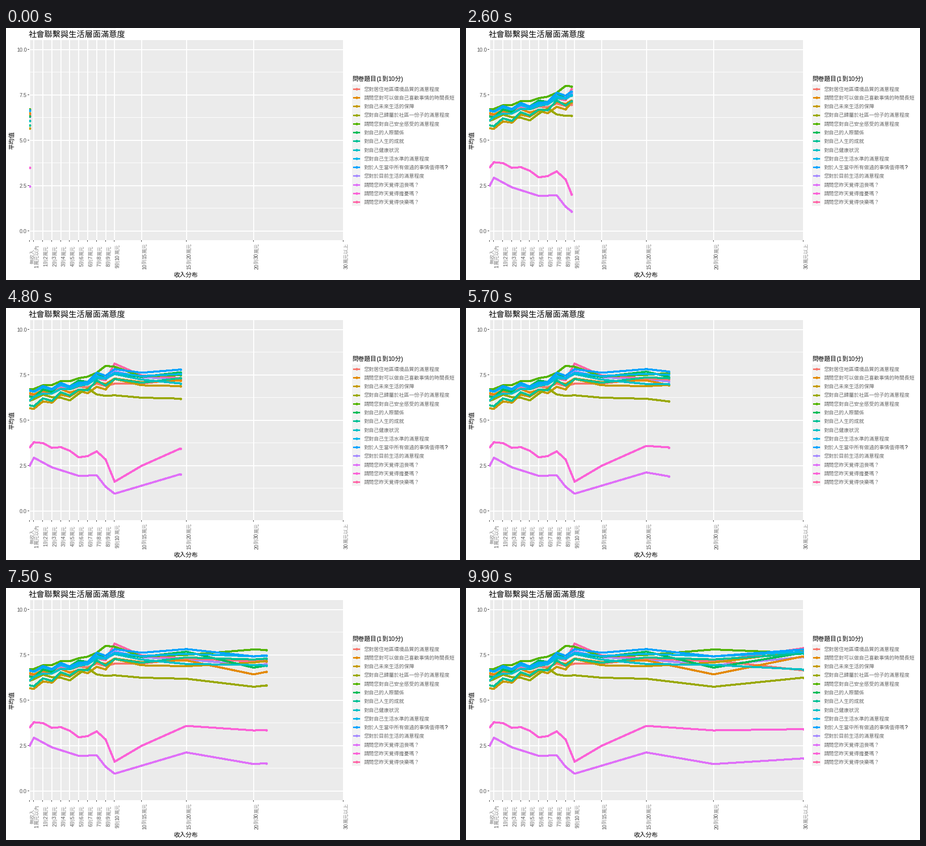
A matplotlib script for the animation above (10000 ms loop, 900 by 500 pixels).

```python
from itertools import groupby

import matplotlib.pyplot as plt
import numpy as np
from matplotlib.animation import FuncAnimation
from matplotlib.patches import Rectangle

FRAMES = 100
PX = 0.72  # points per pixel at 100 dpi
LEFT, RIGHT, TOP, BOTTOM = 45.5, 668.5, 23.5, 420.5

fig = plt.figure(figsize=(9, 5), dpi=100, facecolor="white")
ax = fig.add_axes([0, 0, 1, 1])
ax.set(xlim=(-0.5, 899.5), ylim=(499.5, -0.5))
ax.axis("off")


def px(income):
    return 46 + np.asarray(income) * 622 / 35


def py(score):
    return 402.96 - np.asarray(score) * 36.09


def box(x0, y0, x1, y1, color):
    rect = Rectangle((x0, y0), x1 - x0, y1 - y0, fc=color, lw=0, zorder=0)
    return ax.add_patch(rect)


def rule(xs, ys, color="white", width=1):
    ax.plot(xs, ys, color=color, lw=width * PX, zorder=1,
            solid_capstyle="butt", snap=False)


def write(x, y, text, size, latin="black", han="black", align=0.0, up=False):
    """Text centred on its line, each script in its own font and tone."""
    runs = [(ascii_, "".join(g)) for ascii_, g in groupby(text, str.isascii)]
    advance = {".": 0.278, "(": 0.333, ")": 0.333}
    widths = [size * sum(advance.get(c, 0.556) if a else 1 for c in s)
              for a, s in runs]
    pos = -align * sum(widths)
    drop = 0.37 * size
    for (ascii_, run), w in zip(runs, widths):
        at = (x + drop, y - pos) if up else (x + pos, y + drop)
        ax.text(*at, run, size=size * PX, rotation=90 if up else 0,
                rotation_mode="anchor", ha="left", va="baseline",
                color=latin if ascii_ else han, zorder=5,
                family="Liberation Sans" if ascii_ else "Noto Sans CJK JP")
        pos += w


# Income brackets by midpoint
edges = [*range(1, 11), 15, 20, 30]
incomes = np.array([0, 0.5, *np.convolve(edges, [0.5, 0.5], "valid"), 35])
labels = ["無收入", "1萬元以內",
          *(f"{a}到{b}萬元" for a, b in zip(edges, edges[1:])), "30萬元以上"]
xs = px(incomes)
keys = np.rint((FRAMES - 1) * incomes / 35)

# Panel, grid and axes
panel = box(LEFT, TOP, RIGHT, BOTTOM, "#EBEBEB")
for v in np.arange(1.25, 10, 2.5):
    rule([LEFT, RIGHT], [np.floor(py(v))] * 2)
for v in np.arange(0, 10.1, 2.5):
    y = np.floor(py(v))
    rule([LEFT, RIGHT], [y + 0.5] * 2, width=2)
    rule([42.5, LEFT], [y, y], "#333333")
    write(40.5, y + 0.4, f"{v:.1f}", 10.4, latin="#4D4D4D", align=1)
for x, label in zip(xs, labels):
    col = np.floor(x)
    rule([col + 0.5] * 2, [TOP, BOTTOM], width=2)
    rule([col, col], [BOTTOM, 423.5], "#333333")
    write(x + 5.5, 452.3, label, 10, "#4D4D4D", "#8C8C8C", align=0.5, up=True)

write(44.2, 11.8, "社會聯繫與生活層面滿意度", 16)
write(356.5, 488.7, "收入分布", 12, align=0.5)
write(10.5, 222.5, "平均值", 12, align=0.5, up=True)
write(686, 100, "問卷題目(1到10分)", 12)
box(685.5, 111.5, 702.5, 352.5, "#F2F2F2")

TURNS = [0, 5.5, 9.5, 17.5, 25, 35]  # incomes where most answers turn
series = []


def scores_from(turns, wave, bends):
    """Lines between turning points, with a zigzag that grows with income."""
    points = dict(zip(TURNS, turns)) | bends
    at = sorted(points)
    k = np.arange(len(incomes))
    zigzag = wave * (-1.0) ** k * (1 + k / 11)
    zigzag[np.isin(incomes, at)] = 0
    return np.interp(incomes, at, [points[i] for i in at]) + zigzag


def survey(color, question, *turns, wave=0.08, bends={}, layer=3):
    """Add one question: its legend row and its animated line and dot."""
    row = 119.7 + 17.28 * len(series)
    y = round(row)
    style = dict(color=color, lw=3 * PX, solid_capstyle="butt",
                 solid_joinstyle="round", antialiased=False)
    dot = dict(color=color, marker="o", ms=5.2 * PX, mew=0, ls="none")
    ax.plot([687.5, 700.5], [y, y], zorder=3, **style)
    ax.plot([694], [y], zorder=3, **dot)
    write(709, row + 0.6, question, 10, han="#6A6A6A")
    line, = ax.plot([], [], zorder=layer, **style)
    head, = ax.plot([], [], zorder=layer + 0.5, **dot)
    for artist in (line, head):
        artist.set_clip_path(panel)
    series.append((line, head, py(scores_from(turns, wave, bends))))


survey("#F8766D", "您對居住地區環境品質的滿意程度",
       6.4, 6.86, 7.02, 7.3, 7.2, 6.65, wave=0.05)
survey("#E38900", "請問您對可以做自己喜歡事情的時間長短",
       6.5, 6.68, 7.3, 7.2, 6.43, 7.42)
survey("#C49A00", "對自己未來生活的保障",
       5.66, 6.63, 7.28, 6.88, 7.08, 7.7, wave=0.1, bends={8.5: 6.7})
survey("#99A800", "您對自己歸屬於社區一份子的滿意程度",
       6.08, 6.47, 6.38, 6.19, 5.75, 6.25, wave=0.03,
       bends={1.5: 6.42, 4.5: 6.1, 6.5: 6.75, 7.5: 6.43})
survey("#53B400", "請問您對自己安全感受的滿意程度",
       6.72, 7.32, 7.95, 7.5, 7.8, 7.6, wave=0.04,
       bends={7.5: 7.62, 8.5: 8.0, 12.5: 7.42})
survey("#00BC56", "對自己的人際關係",
       6.32, 7.2, 7.6, 7.68, 6.8, 7.62, wave=0.12)
survey("#00C094", "對自己人生的成就",
       5.83, 6.7, 7.28, 7.36, 7.25, 7.57, wave=0.12)
survey("#00BFC4", "對自己健康狀況",
       6.08, 6.9, 7.55, 7.0, 6.95, 6.7, wave=0.05, bends={0.5: 6.3})
survey("#00B6EB", "您對自己生活水準的滿意程度",
       6.63, 6.97, 7.62, 7.56, 7.42, 7.67)
survey("#06A4FF", "對於人生當中所有做過的事情值得嗎?",
       6.66, 7.08, 7.82, 7.82, 7.42, 7.8, wave=0.1)
survey("#A58AFF", "您對於目前生活的滿意程度",
       6.3, 7.02, 7.7, 7.25, 6.93, 7.38, layer=2)
survey("#DF70F8", "請問您昨天覺得沮喪嗎？",
       2.48, 1.95, 0.97, 2.14, 1.5, 1.81, wave=0,
       bends={0.5: 2.95, 2.5: 2.42, 7.5: 1.98, 8.5: 1.35})
survey("#FB61D7", "請問您昨天覺得擔憂嗎？",
       3.5, 2.97, 1.63, 3.6, 3.35, 3.42, wave=0.06,
       bends={0.5: 3.8, 4.5: 3.33, 7.5: 3.3, 8.5: 2.85, 12.5: 2.5})
survey("#FF66A8", "請問您昨天覺得快樂嗎？",
       6.4, 7.13, 8.12, 7.3, 7.14, 7.87, bends={8.5: 7.2, 12.5: 7.47},
       layer=2)


def update(frame):
    """Reveal every line up to a head that reaches each key on time."""
    n = np.count_nonzero(keys <= frame)
    hx = np.interp(frame, keys, xs)
    for line, head, ys in series:
        hy = np.interp(frame, keys, ys)
        line.set_data([*xs[:n], hx], [*ys[:n], hy])
        head.set_data([hx], [hy])
    return [artist for line, head, _ in series for artist in (line, head)]


anim = FuncAnimation(fig, update, frames=FRAMES, interval=100,
                     init_func=lambda: update(0), repeat=True, repeat_delay=0)
plt.show()
```
